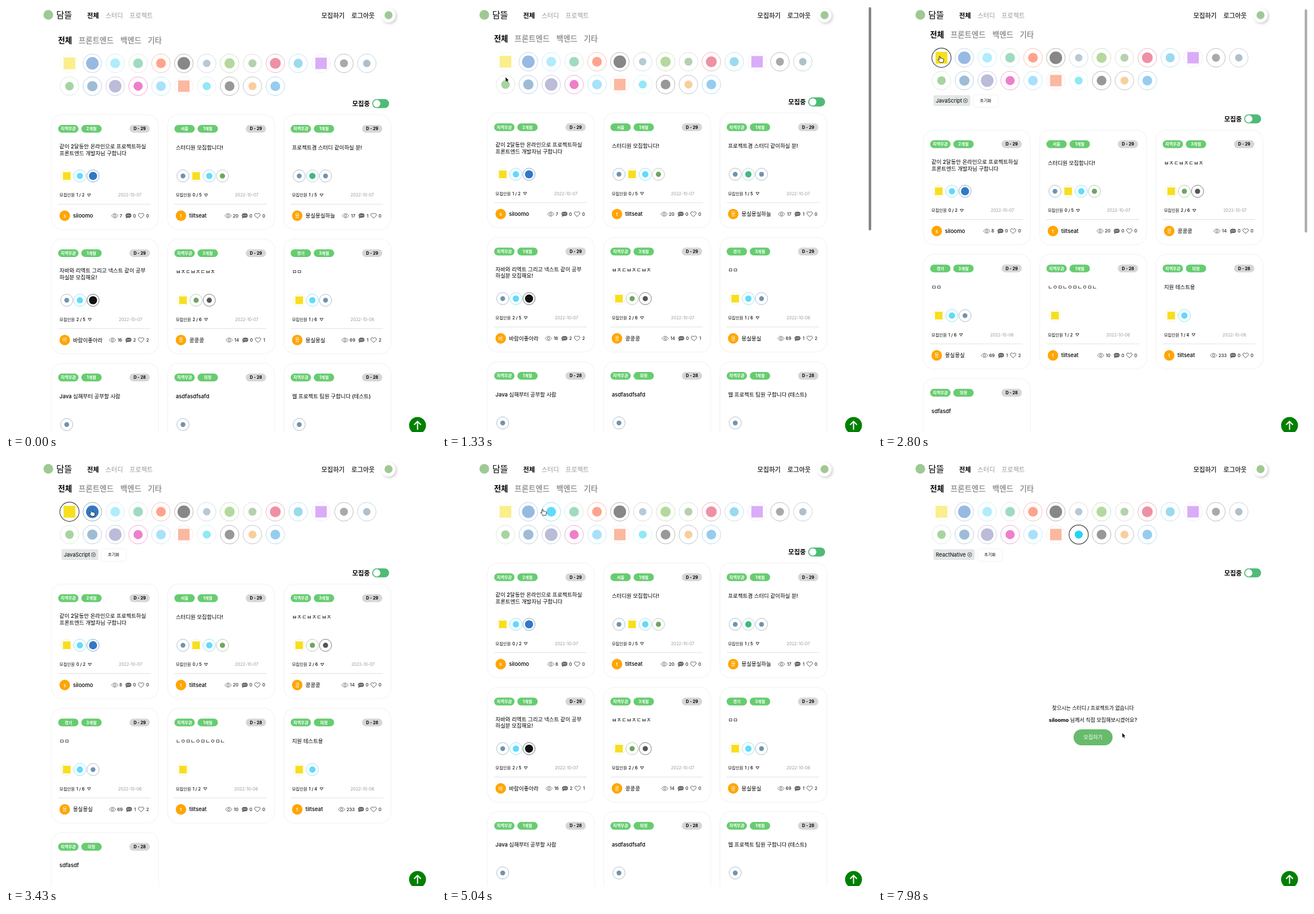
These frames come from a looping animation (752x745 px, 8 s). An HTML page:

```html
<!DOCTYPE html>
<html lang="ko">
<meta charset="utf-8">
<style>
  html, body { margin: 0; width: 100%; height: 100%; overflow: hidden; background: #fff; }
  svg { display: block; }
  text { font-family: Inter, "Noto Sans CJK KR", "Noto Sans CJK", sans-serif; white-space: pre; }
  .b { font-weight: 700; }
  .m { font-weight: 500; }
  .c { text-anchor: middle; }
  .e { text-anchor: end; }
  .card { fill: #fff; filter: drop-shadow(.6px .9px 1.1px #0002); }
  .avatar { fill: #fff; filter: drop-shadow(2px 2px 2.5px #0003); }
</style>
<svg id="stage" width="752" height="745"></svg>
<script>
const LOOP = 8000, STEP = 70;
const stage = document.getElementById('stage');

// name: [colour, half size, ring colour, square]
const ICONS = {
  js: ['#f7df1e', 10.3, '#f3ecc0', 1], ts: ['#3178c6', 11, '#5f86a8'], react: ['#61dafb', 8.5],
  vue: ['#41b883', 8.5, '#9ccbb8'], svelte: ['#ff4a1c', 8.5], next: ['#111', 11, '#333'],
  java: ['#6f94b0', 6.5, '#8aa0b0'], spring: ['#6db33f', 9], node: ['#6fa560', 7, '#9ab596'],
  nest: ['#e0234e', 9.5], go: ['#38b6de', 8], kotlin: ['#b65cf2', 10, '#d5c3ea', 1],
  express: ['#555', 7, '#444'], mysql: ['#5d8299', 6.5], mongo: ['#4faa41', 7.5, '#9cc49a'],
  python: ['#3f7cae', 9], php: ['#777bb3', 11], graphql: ['#e10098', 8],
  flutter: ['#54c5f8', 8.5], swift: ['#fa7343', 10, '#f3c9b5', 1], native: ['#24d3f2', 7, '#8fe4f5'],
  unity: ['#333', 8.5], aws: ['#f0a040', 7, '#555'], docker: ['#2f9be0', 8.5]
};
const KEYS = Object.keys(ICONS);
const CHIPS = { js: ['JavaScript', 64.5], ts: ['TypeScript', 66], native: ['ReactNative', 72] };

// place, term, days, title, icons, joined, date, user, views, comments, likes
const ANY = '지역무관', D7 = '2022-10-07', D6 = '2022-10-06';
const first = (joined, views) => [ANY, '2개월', 29, '같이 2달동안 온라인으로 프로젝트하실|프론트엔드 개발자님 구합니다',
  'js ts'.replace(' ', ' react '), joined, D7, 'siloomo', views, 0, 0];
const A = first('1 / 2', 7), A2 = first('0 / 2', 8);
const B = ['서울', '1개월', 29, '스터디원 모집합니다!', 'java js react node', '0 / 5', D7, 'tiltseat', 20, 0, 0];
const C = [ANY, '1개월', 29, '프로젝트겸 스터디 같이하실 분!', 'java vue java', '1 / 5', D7, '몽실몽실하늘', 17, 1, 0];
const D = [ANY, '1개월', 29, '자바와 리엑트 그리고 넥스트 같이 공부|하실분 모집해요!', 'java react next', '2 / 5', D7, '바람이좋아라', 16, 2, 2];
const E = [ANY, '3개월', 29, 'ㅂㅈㄷㅂㅈㄷㅂㅈ', 'js node express', '2 / 6', D7, '콩콩콩', 14, 0, 1];
const F = ['경기', '3개월', 29, 'ㅁㅁ', 'js react java', '1 / 6', D6, '몽실몽실', 69, 1, 2];
const plain = (term, title, icons = 'java', joined = '1 / 2', views = 10) =>
  [ANY, term, 28, title, icons, joined, D6, 'tiltseat', views, 0, 0];
const likes = (card, n) => [...card.slice(0, 10), n];
const REST = [plain('1개월', 'Java 심해부터 공부할 사람'), plain('미정', 'asdfasdfsafd'), plain('1개월', '웹 프로젝트 팀원 구합니다 (테스트)')];
const LISTS = {
  before: [A, B, C, D, E, F, ...REST],
  after: [A2, B, C, likes(D, 1), likes(E, 0), F, ...REST],
  js: [A2, B, likes(E, 0), F, plain('1개월', 'ㄴㅇㅁㄴㅇㅁㄴㅇㅁㄴ', 'js'),
    plain('미정', '지원 테스트용', 'js react', '1 / 4', 233), plain('미정', 'sdfasdf', 'js')],
  ts: [A2],
  native: []
};
// start time, chosen icons, list
const STATES = [[0, [], 'before'], [2800, ['js'], 'js'], [3640, ['js', 'ts'], 'js'],
  [4340, ['ts'], 'ts'], [4760, [], 'after'], [6230, ['native'], 'native']];

const SCROLL = [[1050, 0], [1190, .6], [1610, 9.3], [2170, 9.3], [2240, 9.8]];
const BAR = [[350, 0], [560, .5], [1820, .5], [2030, .04], [2170, .04], [2240, .45], [2730, .45], [2940, 0]];
const MOUSE_X = [[420, 305], [1050, 112], [1190, 111], [1820, 111], [2030, 107], [2730, 107], [3430, 149], [3920, 149],
  [4130, 115], [4270, 115], [4550, 150], [4900, 150], [5040, 176], [5460, 458], [5810, 360], [5950, 361],
  [7280, 361], [7350, 357], [7560, 357], [7980, 427]];
const MOUSE_Y = [[420, 575], [1050, 128], [1190, 124], [1820, 124], [2030, 88], [2730, 88], [3430, 87.5], [4900, 88], [5040, 86],
  [5460, 111], [5810, 129], [5950, 131], [7560, 131], [7980, 477]];

function track(points, t) {
  if (t <= points[0][0]) return points[0][1];
  for (let i = 1; i < points.length; i++) {
    const [t0, a] = points[i - 1], [t1, b] = points[i];
    if (t <= t1) {
      const p = (t - t0) / (t1 - t0);
      return a + (b - a) * p * p * (3 - 2 * p);
    }
  }
  return points.at(-1)[1];
}

const text = (x, y, s, size, cls = '', fill = '#000') =>
  `<text x="${x}" y="${y}" font-size="${size}" class="${cls}" fill="${fill}">${s}</text>`;
const rect = (x, y, w, h, r, fill, extra = '') =>
  `<rect x="${x}" y="${y}" width="${w}" height="${h}" rx="${r}" fill="${fill}" ${extra}/>`;
const circle = (x, y, r, fill, extra = '') => `<circle cx="${x}" cy="${y}" r="${r}" fill="${fill}" ${extra}/>`;
const path = (d, fill, extra = '') => `<path d="${d}" fill="${fill}" ${extra}/>`;
const group = (x, y, s, extra = '') => `<g transform="translate(${x} ${y})" ${extra}>${s}</g>`;
const stroke = (colour, w) => `stroke="${colour}" stroke-width="${w}"`;

function icon(key, x, y, scale, alpha = 1, chosen = false) {
  const [colour, size, ring = colour, square] = ICONS[key], r = size * scale;
  const mark = square ? rect(-r, -r, 2 * r, 2 * r, 0, colour) : circle(0, 0, r, colour);
  const edge = chosen ? circle(0, 0, 16.8, '#fff', stroke('#444', 1.2))
    : circle(0, 0, 16.4 * scale, '#fff', stroke(ring, .7));
  return group(x, y, edge + mark, `opacity="${alpha}"`);
}

const EYE = path('M-5.7 0Q0-7.6 5.7 0Q0 7.6-5.7 0Z', 'none', stroke('#555', .8)) + circle(0, 0, 1.9, 'none', stroke('#555', .8));
const BUBBLE = path('M-1.5-4.2H1.5A3.8 3.8 0 0 1 1.5 3.4H-1.5L-4.5 4.8L-4 2.2A3.8 3.8 0 0 1-1.5-4.2Z', '#666') +
  [-2.4, 0, 2.4].map(x => circle(x, -.4, .75, '#fff')).join('');
const HEART = path('M0 4.4L-4 .4C-6.6-2.6-2.4-6.2 0-2.7C2.4-6.2 6.6-2.6 4 .4Z', 'none', stroke('#444', .9));

function stats(counts) {
  let x = 169.9, out = '';
  [[HEART, 8.6, 9], [BUBBLE, 8.3, 10.8], [EYE, 8, 0]].forEach(([shape, before, after], i) => {
    const n = String(counts[2 - i]);
    out += text(x, 179, n, 7.7, 'e m', '#222');
    x -= before + [...n].reduce((w, d) => w + (d == '1' ? 4 : 5), 0);
    out += group(x, 176.2, shape);
    x -= after;
  });
  return out;
}

function card([place, term, days, title, icons, joined, date, user, ...counts], i) {
  const pill = (x, s, fill, ink) => rect(x, 17.4, 35.6, 13.6, 6.8, fill) + text(x + 17.8, 26.9, s, 7.2, 'c b', ink);
  const lines = title.split('|'), narrow = joined[0] == '1' ? 1.3 : 0;
  return group(80 + i % 3 * 203.3, 190.6 + Math.floor(i / 3) * 217.4,
    '<rect class="card" width="186" height="199.5" rx="18"/>' +
    pill(11.2, place, '#67cc70', '#fff') + pill(51.7, term, '#67cc70', '#fff') + pill(136, 'D - ' + days, '#d6d6d6', '#000') +
    lines.map((s, k) => text(13.6, (lines[1] ? 58.4 : 60.2) + k * 11.9, s, 9.4, 'm')).join('') +
    icons.split(' ').map((key, k) => icon(key, 26.2 + k * 23, 106.6, .65)).join('') +
    text(13.6, 142.8, '모집인원', 7.2, 'm') + text(43, 142.8, joined, 7.4, 'm') +
    path(`M${63.7 - narrow} 138.2h5.6l-2.8 4.4Z`, 'none', stroke('#222', .9)) +
    text(117.3 - narrow, 142.8, date, 7.3, '', '#999') +
    rect(11, 155.7, 162, .8, 0, '#d9d9d9') +
    circle(22.7, 176.1, 9.2, '#ffa500') + text(22.7, 179.4, user[0], 9, 'c m', '#fff') +
    text(37.2, 179.5, user, 9.4, 'm') + stats(counts));
}

function chips(chosen) {
  let x = 97, out = '';
  for (const key of chosen) {
    const [label, w] = CHIPS[key];
    out += rect(x, 165.9, w, 19, 3, '#e4e7e7') + text(x + 4, 178.9, label, 9.2) +
      circle(x + w - 8.6, 175.4, 3.6, 'none', stroke('#222', .7)) +
      path(`M${x + w - 10} 174l2.8 2.8m0-2.8l-2.8 2.8`, 'none', stroke('#222', .8));
    x += w + 5.7;
  }
  return out + rect(x, 165.9, 42.5, 20.3, 4, '#fff', 'class="card"') + text(x + 21, 178, '초기화', 7.2, 'c m');
}

const EMPTY = text(376, 447, '찾으시는 스터디 / 프로젝트가 없습니다', 8.85, 'c m') +
  text(376, 468, '<tspan font-weight="700">siloomo</tspan> 님께서 직접 모집해보시겠어요?', 9, 'c m') +
  rect(342, 480.8, 68.2, 28, 14, '#67bb6b') + text(376, 498, '모집하기', 9, 'c m', '#fff');

const HEADER = rect(0, 0, 752, 35, 0, '#fff') +
  circle(74, 15.5, 8.5, '#9fc994') + text(88, 21, '담뜰', 15) +
  text(142, 21.2, '전체', 11.1, 'b') + text(174, 21.2, '스터디', 11.1, 'm', '#999') + text(216, 21.2, '프로젝트', 11.1, 'm', '#999') +
  text(551.5, 21.2, '모집하기', 11.1, 'b', '#444') + text(604, 21.2, '로그아웃', 11.1, 'b', '#444') +
  '<circle class="avatar" cx="669" cy="16.5" r="12.3"/>' + circle(669, 16, 7, '#9fc994');

const CATEGORIES = text(91, 65.3, '전체', 13.3, 'b') +
  [[127, '프론트엔드'], [200, '백엔드'], [248, '기타']].map(([x, s]) => text(x, 65.3, s, 13.3, 'b', '#999')).join('');

const TOGGLE = text(605.5, 174.8, '모집중', 11.1, 'b') + rect(640.4, 162.7, 29.6, 15.8, 7.9, '#4fbb77') + circle(648.4, 170.6, 6.3, '#fff');

const UP = circle(719.7, 733.5, 14.8, '#008000') +
  path('M719.7 741V727M713.7 732.5L719.7 726.5L725.7 732.5', 'none', stroke('#fff', 2));

const ARROW = path('M0 0V8.6L2 6.9L3.5 10L5 9.4L3.6 6.3H6.2Z', '#000', stroke('#fff', .6));
const HAND = path('M-1.2 1C-1.2-.4.7-.4.8 1V3.6C2 3 3 3.2 3.3 4C4.4 3.6 5 4 5.3 4.7C6.3 4.5 6.8 5 6.8 6C6.8 8 6 9 5.7 10.8H.2C-.8 9-2.4 7.7-3.4 6.3C-3.6 5.2-2.3 5-1.2 6.3Z',
  '#fff', stroke('#000', .8));

function scene(t) {
  const [, chosen, list] = STATES.findLast(s => t >= s[0]);
  const scroll = track(SCROLL, t), x = track(MOUSE_X, t), y = track(MOUSE_Y, t);
  const shift = chosen.length ? 36.6 : 0;
  let over = false;
  const icons = KEYS.map((key, i) => {
    const cx = 111 + i % 14 * 40, cy = 100.3 + (i > 13 ? 39.9 : 0);
    const hover = t >= 2450 && Math.hypot(x - cx, y + scroll - cy) < 16.5;
    over ||= hover;
    const on = chosen.includes(key);
    return icon(key, cx, cy, 1, on ? 1 : hover ? (t < 2520 ? .75 : 1) : .5, on);
  }).join('');
  const cards = LISTS[list];
  const body = CATEGORIES + icons + (chosen.length ? chips(chosen) : '') +
    group(0, shift, TOGGLE + cards.map(card).join('')) + (cards.length ? '' : EMPTY);
  return group(0, -scroll, body) + HEADER + UP +
    rect(746.3, .5 + scroll * .526, 4.2, 390.5, 2.1, '#000', `opacity="${track(BAR, t)}"`) +
    (t < 420 ? '' : group(x, y, over ? HAND : ARROW));
}

let shown = -1;
function tick(now) {
  const t = Math.floor(now % LOOP / STEP) * STEP;
  if (t != shown) stage.innerHTML = scene(shown = t);
  requestAnimationFrame(tick);
}
tick(performance.now());
</script>
</html>
```
